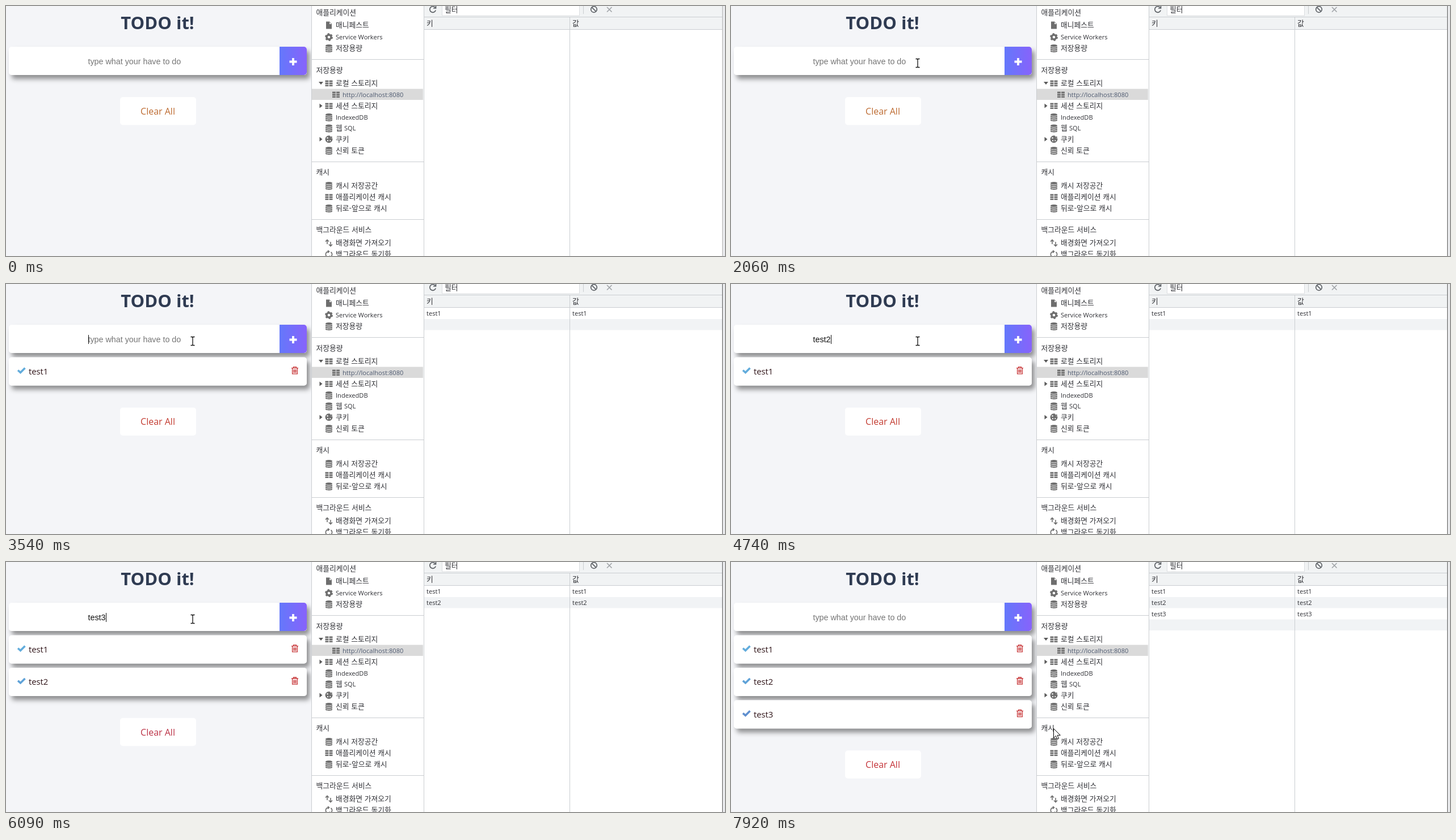
An HTML page that plays this animation: 1267 px wide and 442 px high, repeating every 7990 ms.

```html
<!DOCTYPE html>
<html lang="ko">
<head>
<meta charset="utf-8">
<title>TODO it!</title>
<style>
  html, body { margin: 0; width: 100%; height: 100%; overflow: hidden; background: #fff; }
  svg { display: block; width: 1267px; height: 442px; }
  text { white-space: pre; }
  .ui { font-family: "Open Sans", "Noto Sans", sans-serif; }
  .ko { font: 12.8px "Noto Sans CJK KR", "Noto Sans CJK", "Noto Sans CJK JP", sans-serif; fill: #303136; }
  .en { font: 11.1px "Open Sans", "Noto Sans", sans-serif; fill: #303136; }
  .field { font: 14.3px "Liberation Sans", Arial, sans-serif; }
</style>
</head>
<body>
<svg id="stage" viewBox="0 0 1267 442" xmlns="http://www.w3.org/2000/svg">
  <defs>
    <linearGradient id="violet" x1="0" x2="1" y1="0" y2="0">
      <stop offset="0" stop-color="#6478fb"/><stop offset="1" stop-color="#8763fb"/>
    </linearGradient>
    <filter id="shadow" x="-5%" y="-30%" width="110%" height="180%">
      <feDropShadow dx="5" dy="7" stdDeviation="4" flood-color="#000" flood-opacity=".42"/>
    </filter>
    <g id="db" fill="#6e6e6e">
      <path d="M-6-4.2C-6-7.2 6-7.2 6-4.2S-6-1.2-6-4.2Z"/>
      <path id="disc" d="M-6-2.7C-4-.6 4-.6 6-2.7V-.8C6 1.7-6 1.7-6-.8Z"/>
      <use href="#disc" y="3.3"/><use href="#disc" y="6.4"/>
    </g>
    <path id="grid" fill="#6e6e6e" d="M-6.5-5H-.6V-2H-6.5ZM.6-5H6.5V-2H.6ZM-6.5-1H-.6V2H-6.5ZM.6-1H6.5V2H.6ZM-6.5 3H-.6V5.500H-6.500ZM.6 3H6.500V5.500H.6Z"/>
    <path id="file" fill="#6e6e6e" d="M-5-6.500H1L5-2.500V6.500H-5Z M1.200-5.500V-2H4.500Z" fill-rule="evenodd"/>
    <g id="gear">
      <circle r="4" fill="none" stroke="#6e6e6e" stroke-width="3.400"/>
      <circle r="6" fill="none" stroke="#6e6e6e" stroke-width="2" stroke-dasharray="3.140 3.140"/>
    </g>
    <g id="cookie">
      <circle r="6.500" fill="#6e6e6e"/>
      <path d="M2-7H7V-1.500L3.500-2Z" fill="#fff"/>
      <g fill="#fff"><circle cx="-2.500" cy="-2.200" r="1.200"/><circle cx="-2" cy="2.600" r="1.200"/><circle cx="2.300" cy="2.500" r="1.100"/></g>
      <circle cx="4.500" cy="-3.500" r="1.500" fill="#6e6e6e"/>
    </g>
    <path id="swap" fill="none" stroke="#6e6e6e" stroke-width="1.600" d="M-3 2V-5M-6-2.500L-3-5.500L0-2.500M3-2V5M0 2.500L3 5.500L6 2.500"/>
    <path id="sync" fill="none" stroke="#6e6e6e" stroke-width="1.600" d="M-3.500 4A5 5 0 0 1 0-5M-2-7L.500-5L-2-2.500M3.500-4A5 5 0 0 1 0 5M2 7L-.500 5L2 2.500"/>
    <path id="open" d="M-4-2.500H4L0 2.500Z" fill="#5a5a5a"/>
    <path id="shut" d="M-2.500-4V4L2.500 0Z" fill="#5a5a5a"/>
    <path id="tick" d="M21 152.500L25.500 156.500L33.500 148.500" fill="none" stroke-width="3.600"/>
    <g id="bin" fill="none" stroke="#c8383a" stroke-width="1.300">
      <path d="M503 148.600H515M506.500 148V146.600H511.500V148M504.600 149V158.800H513.400V149M507 151V157M509 151V157M511 151V157"/>
    </g>
    <path id="arrow" d="M.5.500V17L4.400 13.300L7 19.300L9.600 18.200L7.100 12.300H12.300Z" fill="#fff" stroke="#000"/>
    <path id="beam" d="M-3.500-7.500H-1L0-6.500L1-7.500H3.500M0-6.500V6.500M-3.500 7.500H-1L0 6.500L1 7.500H3.500" fill="none" stroke="#111" stroke-width="1.300"/>
  </defs>
  <g id="page"></g>
  <g id="tools"></g>
  <use id="mouse"/>
</svg>
<script>
const LOOP = 7990, PITCH = 57.4;
const NS = "http://www.w3.org/2000/svg";
const page = document.getElementById("page");
const tools = document.getElementById("tools");
const mouse = document.getElementById("mouse");

function add(parent, tag, attrs, text) {
  const el = document.createElementNS(NS, tag);
  for (const k in attrs) el.setAttribute(k, attrs[k]);
  if (text) el.textContent = text;
  parent.appendChild(el);
  return el;
}
const rect = (p, x, y, width, height, fill, more) => add(p, "rect", { x, y, width, height, fill, ...more });
const label = (p, cls, x, y, text, more) => add(p, "text", { class: cls, x, y, ...more }, text);
const icon = (p, id, x, y) => add(p, "use", { href: "#" + id, x, y });
const path = (p, d, stroke, width) => add(p, "path", { d, stroke, "stroke-width": width, fill: "none" });
const card = (p, y) => rect(p, 5, y, 525, 50, "#fff", { rx: 5, filter: "url(#shadow)" });
const show = (el, on) => el.setAttribute("visibility", on ? "visible" : "hidden");

// Todo page
rect(page, 0, 0, 538, 442, "#f4f5f8");
label(page, "ui", 267, 40.5, "TODO it!", { "font-size": 31, "font-weight": 700, "text-anchor": "middle", fill: "#2f3b52" });
card(page, 72);
add(page, "path", { d: "M482 72H525A5 5 0 0 1 530 77V117A5 5 0 0 1 525 122H482Z", fill: "url(#violet)" });
path(page, "M499.500 98.500H512.500M506 92V105", "#fff", 3.8);
const field = label(page, "field", 144.5, 103, " ");
const caret = rect(page, 145, 90, 1, 16, "#111");

const items = [1, 2, 3].map((n, i) => {
  const g = add(page, "g", { transform: `translate(0 ${i * PITCH})` });
  card(g, 129.5);
  icon(g, "tick", 0, 0).setAttribute("stroke", ["#62acdc", "#5fa2d8", "#5f8fcf"][i]);
  label(g, "ui", 40, 160, "test" + n, { "font-size": 14.8, fill: "#301519" });
  icon(g, "bin", 0, 0);
  return g;
});

const clear = add(page, "g", {});
rect(clear, 201, 161, 134, 49.5, "#fff", { rx: 5 });
const clearText = label(clear, "ui", 267.5, 192, "Clear All", { "font-size": 16, "text-anchor": "middle" });

// Sidebar
const LINE = "#cacdd1";
rect(tools, 538, 0, 729, 442, "#fff");
rect(tools, 538, 0, 1, 442, LINE);
rect(tools, 539, 146.5, 196, 19.5, "#dadada");
[94, 275, 377].forEach(y => rect(tools, 539, y, 197, 1, LINE));
[["애플리케이션", 11], ["저장용량", 113], ["캐시", 293.5], ["백그라운드 서비스", 395.5]]
  .forEach(([s, y]) => label(tools, "ko", 546.5, y + 4.5, s));
[
  ["file", "매니페스트", 34], ["gear", "Service Workers", 55], ["db", "저장용량", 74.5],
  ["grid", "로컬 스토리지", 136.5, "open"], ["grid", "세션 스토리지", 176.5, "shut"],
  ["db", "IndexedDB", 196.5], ["db", "웹", 216], ["cookie", "쿠키", 235.5, "shut"],
  ["db", "신뢰 토큰", 255.5], ["db", "캐시 저장공간", 317.5], ["grid", "애플리케이션 캐시", 337.5],
  ["db", "뒤로-앞으로 캐시", 357.5], ["swap", "배경화면 가져오기", 419], ["sync", "백그라운드 동기화", 439]
].forEach(([id, s, y, twist]) => {
  icon(tools, id, 569, y);
  label(tools, s < "a" ? "en" : "ko", 581, y + 4.4, s);
  if (twist) icon(tools, twist, 555, y);
});
label(tools, "en", 596, 220.4, "SQL");
icon(tools, "grid", 581.5, 156.5);
label(tools, "en", 593, 160.5, "http://localhost:8080", { style: "fill:#4e5a70" });

// Storage table
rect(tools, 736, 0, 1, 442, LINE);
rect(tools, 737, 0, 525, 41, "#f1f3f4");
rect(tools, 768.5, -4, 242, 21, "#fff", { stroke: "#dcdee1" });
label(tools, "ko", 773, 11, "필터");
path(tools, "M756.500 3A5.300 5.300 0 1 0 757.200 7.500M757.500-.500V4H753", "#5f6368", 1.7);
rect(tools, 1017, 0, 1, 14, LINE);
add(tools, "circle", { cx: 1036, cy: 6, r: 5.3, fill: "none", stroke: "#5f6368", "stroke-width": 1.7 });
path(tools, "M1032.300 2.300L1039.700 9.700", "#5f6368", 1.7);
path(tools, "M1059 2L1067.500 10.500M1067.500 2L1059 10.500", "#a2a5a9", 1.7);
rect(tools, 737, 19, 525, 1, LINE);
rect(tools, 737, 41, 525, 1, LINE);
label(tools, "ko", 741, 35, "키");
label(tools, "ko", 998, 35, "값");
const stripes = [62, 101.5].map(y => rect(tools, 737, y, 525, 19.5, "#f1f3f5"));
const rows = [1, 2, 3].map((n, i) => {
  const g = add(tools, "g", {});
  [741, 998].forEach(x => label(g, "en", x, 56 + i * 19.8, "test" + n));
  return g;
});
rect(tools, 993, 20, 1, 422, LINE);
rect(tools, 1263, 0, 4, 442, "#e9eaec");
const edge = rect(tools, 1262, 0, 1, 442, "#b4b4b4");

// Timelines: [start, value...]; each holds until the next entry
const TYPED = [
  [0, ""], [2590, "t"], [2660, "te"], [2790, "tes"], [2930, "test"], [3130, "test1"],
  [3540, ""], [3740, "t"], [3880, "te"], [4010, "tes"], [4210, "test"], [4740, "test2"],
  [5160, ""], [5430, "t"], [5560, "te"], [5690, "tes"], [5820, "test"], [6090, "test3"], [6620, ""]
];
const CARET = [[0, 0], [1540, 1], [2060, 0], [2590, 1], [3680, 0], [3740, 1], [5290, 0], [5430, 1], [6620, 0], [7150, 1], [7680, 0]];
const COUNT = [[0, 0], [3540, 1], [5160, 2], [6620, 3]];
const MOUSE = [
  [0], [70, 1120, 428], [130, 556, 287], [200],
  [990, 87, 45], [1060, 130, 84], [1120, 178, 112], [1190, 235, 120], [1260, 285, 115], [1320, 318, 106], [1390, 329, 101],
  [7420, 334, 104], [7490, 358, 120], [7560, 420, 168], [7630, 505, 244], [7700, 580, 314], [7780, 608, 338], [7850, 592, 320], [7920, 568, 294]
];
const CARET_X = [145, 149, 157, 164, 168, 176];
const CLEAR_FILL = ["#bd6a30", "#c33b30", "#bb3145", "#c43338"];

function at(list, t) {
  let cur = list[0];
  for (const step of list) if (step[0] <= t) cur = step;
  return cur;
}

function draw(t) {
  const typed = at(TYPED, t)[1], count = at(COUNT, t)[1];
  field.textContent = typed || "type what your have to do";
  field.setAttribute("fill", typed ? "#111" : "#757575");
  caret.setAttribute("x", CARET_X[typed.length]);
  show(caret, at(CARET, t)[1]);

  items.forEach((g, i) => show(g, i < count));
  rows.forEach((g, i) => show(g, i < count));
  stripes.forEach((s, i) => show(s, count >= 2 * i + 1));
  clear.setAttribute("transform", `translate(0 ${count * PITCH})`);
  clearText.setAttribute("fill", CLEAR_FILL[count]);
  edge.setAttribute("fill", t < 1600 ? "#b4b4b4" : "#5c5c5c");

  const [, x, y] = at(MOUSE, t);
  show(mouse, x !== undefined);
  if (x === undefined) return;
  const inField = x > 143 && x < 343 && y > 72 && y < 122;
  mouse.setAttribute("href", inField ? "#beam" : "#arrow");
  mouse.setAttribute("transform", `translate(${x} ${y})`);
}

function tick(now) {
  draw(now % LOOP);
  requestAnimationFrame(tick);
}
draw(0);
requestAnimationFrame(tick);
</script>
</body>
</html>
```
